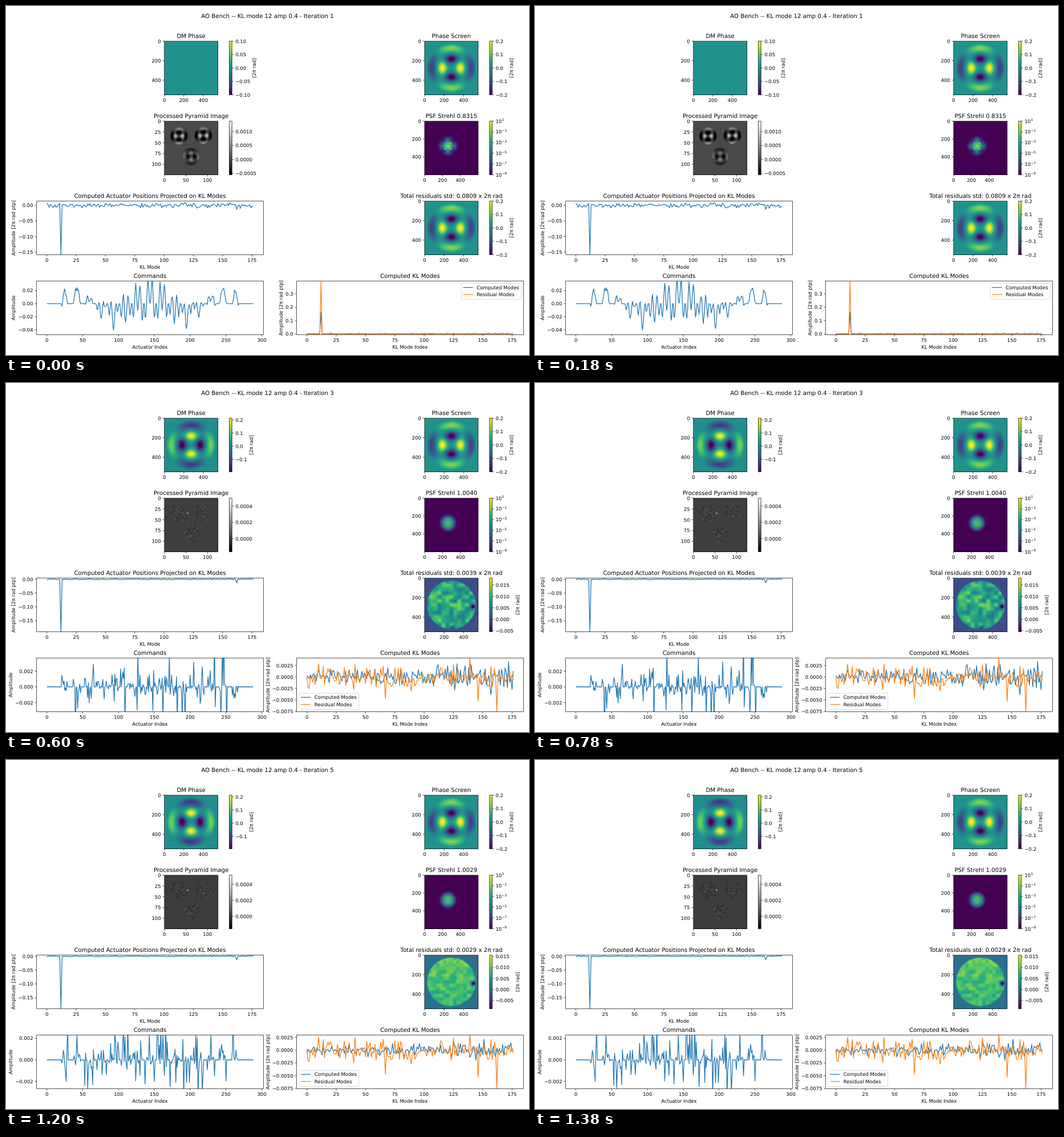
An HTML page with a canvas that plays this animation: 917 px wide and 611 px high, repeating every 1.5 s.

```html
<!DOCTYPE html>
<html lang="en">
<head>
<meta charset="utf-8">
<title>AO Bench</title>
<style>
html, body { margin: 0; width: 100%; height: 100%; overflow: hidden; background: #fff; }
canvas { display: block; }
</style>
</head>
<body>
<canvas id="stage" width="917" height="611"></canvas>
<script>
const W = 917, H = 611, STEP = 300;
const PT = 0.849, SMALL = 10 * PT, BIG = 12 * PT, SIDE = 94;
const BLUE = '#1f77b4', ORANGE = '#ff7f0e';
const FONT = '"DejaVu Sans", sans-serif';
const MODES = 177, GRID = 17, SPIKE = 12, HOT = 162;
let g;

const clamp = (v, a = 0, b = 1) => Math.min(b, Math.max(a, v));
const bell = (d, s) => Math.exp(-(d * d) / (s * s));
const inside = (r, R, soft = 1.5) => 1 / (1 + Math.exp((r - R) * soft));
const disc = (x, y) => inside(Math.hypot(x, y), 43, 2.5);

function random(seed) {
  let s = seed * 7919 + 17;
  return () => {
    s = (s + 0x6D2B79F5) | 0;
    let t = Math.imul(s ^ (s >>> 15), s | 1);
    t ^= t + Math.imul(t ^ (t >>> 7), t | 61);
    return ((t ^ (t >>> 14)) >>> 0) / 4294967296;
  };
}

// Smooth 2D noise from -1 to 1 on a repeating lattice
function mottle(seed, cell) {
  const n = 64, rnd = random(seed), grid = Array.from({ length: n * n }, () => rnd() * 2 - 1);
  const at = (i, j) => grid[(j & (n - 1)) * n + (i & (n - 1))];
  const ease = t => t * t * (3 - 2 * t);
  return (x, y) => {
    const u = x / cell, v = y / cell, i = Math.floor(u), j = Math.floor(v);
    const a = ease(u - i), b = ease(v - j);
    return (at(i, j) * (1 - a) + at(i + 1, j) * a) * (1 - b) +
      (at(i, j + 1) * (1 - a) + at(i + 1, j + 1) * a) * b;
  };
}

// Colour maps
const VIRIDIS = '440154 472d7b 3b528b 2c728e 21918c 28ae80 5ec962 addc30 fde725'.split(' ')
  .map(h => [0, 2, 4].map(k => parseInt(h.substr(k, 2), 16)));
function viridis(v) {
  const p = clamp(v) * 8, i = Math.min(7, Math.floor(p));
  return VIRIDIS[i].map((c, k) => c + (VIRIDIS[i + 1][k] - c) * (p - i));
}
const gray = v => Array(3).fill(clamp(v) * 255);

// Fields, in pixels from the panel centre
function mode(x, y) {
  const r = Math.hypot(x, y) || 1;
  const radial = 0.215 * bell(r - 16, 8) - 0.125 * bell(r - 35, 7.5);
  return (x * x - y * y) / (r * r) * radial * inside(r, 43);
}
const missed = (x, y) => mode(x, y) * (0.23 + 0.1 * Math.sin(y / 9));
const corrected = (x, y) => -mode(x, y) * 1.02;
const dmField = i => [() => 0, (x, y) => missed(x, y) - mode(x, y)][i] || corrected;

const coarse = mottle(3, 9), medium = mottle(4, 7), fine = mottle(5, 6);
const dent = (x, y) => bell(Math.hypot(x - 39, y - 3), 4);
const late = (x, y) => disc(x, y) * (0.0083 + 0.0028 * fine(x, y) - 0.00003 * y - 0.02 * dent(x, y));
const residuals = [
  mode,
  (x, y) => disc(x, y) * (missed(x, y) + 0.016 * coarse(x, y) + 0.005),
  (x, y) => disc(x, y) * (0.0085 + 0.005 * medium(x, y) - 0.016 * dent(x, y)
    - 0.012 * bell(Math.hypot(x - 2, y - 41), 5)),
  late,
  late
];

const PUPILS = [[-21.5, -21, 2.4], [21.5, -22, 2.4], [0, 15, -1.3]];
const grain = mottle(6, 4), dust = mottle(8, 1.3);
function pyramid(i, zero) {
  return (x, y) => {
    let v = zero;
    for (const [px, py, gain] of PUPILS) {
      const dx = x - px, dy = y - py, m = inside(Math.hypot(dx, dy), 15.5, 3);
      if (i === 0) v += m * (gain * mode(dx * 2.7, dy * 2.7) - 0.05 + 0.05 * grain(x, y));
      else v += m * (i === 1 ? 0.22 * grain(x, y) : 0.1 * dust(x, y));
    }
    return i > 1 ? v + 0.6 * bell(Math.hypot(x + 6, y + 21), 1.2) : v;
  };
}

function psf(i) {
  return (x, y) => {
    const dx = x + 6, dy = y + 3.5, r = Math.hypot(dx, dy), a = Math.atan2(dy, dx);
    const ring = Math.abs(Math.cos(Math.PI * r / 3.2)), env = 0.95 - 0.03 * r;
    if (i) return env * (0.35 + 0.65 * ring) * inside(r, 12, 0.6);
    const core = (0.7 + 0.2 * bell(r, 2) + 0.1 * dust(dx, dy)) * inside(r, 8.5 - Math.cos(4 * a), 1.3);
    return Math.max(core, env * ring * (0.65 + 0.35 * Math.cos(4 * a)) * inside(r, 15, 0.7));
  };
}

// Text and axes
function text(s, x, y, size = SMALL, align = 'center') {
  g.font = size + 'px ' + FONT;
  g.textAlign = align;
  g.fillStyle = '#000';
  g.fillText(s, x, y);
}
function upright(s, x, y) {
  g.save();
  g.translate(x, y);
  g.rotate(-Math.PI / 2);
  text(s, 0, 0);
  g.restore();
}
function width(s) {
  g.font = SMALL + 'px ' + FONT;
  return g.measureText(s).width;
}
function stroke(points, color, w) {
  g.beginPath();
  points.forEach(([x, y]) => g.lineTo(x, y));
  g.strokeStyle = color;
  g.lineWidth = w;
  g.lineJoin = 'round';
  g.stroke();
}
const hair = (...p) => stroke(p, '#000', 0.8 * PT);
function frame(x, y, w, h) {
  g.strokeStyle = '#000';
  g.lineWidth = 0.8 * PT;
  g.strokeRect(x, y, w, h);
}

// Smallest round step that splits the range into fewer than five parts
function niceStep(range) {
  const p = Math.floor(Math.log10(range)) - 1;
  const m = [1, 2, 2.5, 5, 10, 20, 25, 50].find(k => range / (k * 10 ** p) <= 4.95);
  return { step: m * 10 ** p, digits: (m >= 10 ? -p - 1 : -p) + (m % 5 === 2.5 || m === 25 ? 1 : 0) };
}
const label = (v, d) => (Math.abs(v) < 1e-9 ? 0 : v).toFixed(d).replace('-', '\u2212');

function xTick(x, y, s) {
  hair([x, y], [x, y + 3]);
  text(s, x, y + 12.4);
}
function yTick(x, y, s, dir) {
  hair([x, y], [x + 3 * dir, y]);
  text(s, x + 5.94 * dir, y + 3.1, SMALL, dir < 0 ? 'right' : 'left');
}
function yScale(x, top, [lo, hi], dir) {
  const { step, digits } = niceStep(hi - lo);
  let widest = 0;
  for (let k = Math.ceil(lo / step - 1e-3); k * step <= hi + step * 1e-3; k++) {
    const s = label(k * step, digits);
    yTick(x, top + (hi - k * step) / (hi - lo) * SIDE, s, dir);
    widest = Math.max(widest, width(s));
  }
  return widest;
}

const BAR = 113.9, BAR_W = 4.7;
function bar(x, y, map) {
  for (let k = 0; k < SIDE; k++) {
    g.fillStyle = `rgb(${map(1 - k / (SIDE - 1))})`;
    g.fillRect(x, y + k, BAR_W, k < SIDE - 1 ? 1.5 : 1);
  }
  frame(x, y, BAR_W, SIDE);
}
function barScale(x, y, range, unit) {
  const edge = x + BAR + BAR_W, w = yScale(edge, y, range, 1);
  if (unit) upright('[2π rad]', edge + 15.9 + w, y + SIDE / 2);
}
function powerScale(x, y) {
  const edge = x + BAR + BAR_W;
  for (let p = 1; p >= -9; p -= 2) {
    const ty = y + (1 - p) / 10 * SIDE;
    yTick(edge, ty, '10', 1);
    text(label(p, 0), edge + 6.1 + width('10'), ty - 0.2, SMALL * 0.7, 'left');
  }
}

function panel(x, y, title, field, map, [lo, hi], size = 550, xs = 200, ys = 200) {
  const n = SIDE + 1, img = new ImageData(n, n), off = document.createElement('canvas');
  off.width = off.height = n;
  for (let j = 0; j < n; j++) for (let i = 0; i < n; i++) {
    const c = map((field(i - SIDE / 2, j - SIDE / 2) - lo) / (hi - lo));
    img.data.set([...c, 255], (j * n + i) * 4);
  }
  off.getContext('2d').putImageData(img, 0, 0);
  g.drawImage(off, x, y, SIDE, SIDE);
  frame(x, y, SIDE, SIDE);
  for (let v = 0; v < size; v += xs) xTick(x + v / size * SIDE, y + SIDE, v);
  for (let v = 0; v < size; v += ys) yTick(x, y + v / size * SIDE, v, -1);
  text(title, x + SIDE / 2, y - 5.1, BIG);
  bar(x + BAR, y, map);
}
function phasePanel(x, y, title, field, range) {
  panel(x, y, title, field, viridis, range);
  barScale(x, y, range, true);
}

function chart(x, y, title, xlab, ylab, xstep, range, curves) {
  const [lo, hi] = range, n = curves[0].length, px = i => x + 18.1 + i * 361.8 / (n - 1);
  g.save();
  g.beginPath();
  g.rect(x, y, 398, SIDE);
  g.clip();
  curves.forEach((c, k) =>
    stroke(c.map((v, i) => [px(i), y + (hi - v) / (hi - lo) * SIDE]), k ? ORANGE : BLUE, 1.5 * PT));
  g.restore();
  frame(x, y, 398, SIDE);
  for (let v = 0; px(v) <= x + 398; v += xstep) xTick(px(v), y + SIDE, v);
  const w = yScale(x, y, range, -1);
  text(title, x + 199, y - 5.1, BIG);
  text(xlab, x + 199, y + SIDE + 24.6);
  upright(ylab, x - 11.2 - w, y + SIDE / 2);
}

function legend(x, y) {
  g.beginPath();
  g.roundRect(x, y, 105, 28, 1.7);
  g.fillStyle = 'rgba(255,255,255,.8)';
  g.fill();
  g.strokeStyle = 'rgba(204,204,204,.8)';
  g.lineWidth = PT;
  g.stroke();
  [['Computed Modes', BLUE], ['Residual Modes', ORANGE]].forEach(([s, c], k) => {
    const ty = y + 7 + k * 12.5;
    stroke([[x + 3.4, ty], [x + 20.4, ty]], c, 1.5 * PT);
    text(s, x + 27, ty + 3.1, SMALL, 'left');
  });
}

// Curves
function noise(n, seed, amp) {
  const rnd = random(seed);
  return Array.from({ length: n }, () => amp * (rnd() + rnd() + rnd() - 1.5) * 1.6);
}
const pin = (list, marks) => Object.assign(list, marks);

// Actuators stand on a square grid; those outside the pupil stay at rest
function commands(i, [lo, hi]) {
  const jitter = noise(GRID * GRID, 60 + i, (hi - lo) * (i ? 0.23 : 0.03));
  const mid = (GRID - 1) / 2, pitch = SIDE / GRID;
  return jitter.map((v, k) => {
    const x = k % GRID - mid, y = Math.floor(k / GRID) - mid;
    if (Math.hypot(x, y) > 8.1 || Math.max(Math.abs(x), Math.abs(y)) >= mid) return 0;
    if (i > 1) return v * Math.abs(v) / (hi - lo) * 4.5;
    return v + (i ? 0.2 * missed(x * pitch, y * pitch) : 0.19 * mode(x * pitch, y * pitch));
  });
}

const projected = (i, [lo]) =>
  pin(noise(MODES, 20 + (i > 0), i ? 0.0011 : 0.0045), { [SPIKE]: lo, [HOT]: -0.013 });

function modes(i, [lo, hi]) {
  if (i === 0) return [[0.004, 0.16], [0.002, hi]].map(([amp, top], k) =>
    pin(noise(MODES, 31 + k, amp).map(Math.abs), { [SPIKE]: top }));
  if (i === 1) {
    const fade = k => 0.35 + 0.8 * Math.exp(-k / 35);
    const base = noise(MODES, 33, 0.009).map((v, k) => v * fade(k));
    const extra = noise(MODES, 34, 0.005).map((v, k) => v * fade(k));
    return [pin(base.slice(), { [SPIKE]: 0.031 }),
      pin(base.map((v, k) => v + extra[k]), { [SPIKE]: hi, 6: lo })];
  }
  const amp = (hi - lo) * 0.13;
  return [
    noise(MODES, 35 + i, amp * (i > 2 ? 0.65 : 0.9)).map((v, k) => v * (0.5 + k / MODES)),
    pin(noise(MODES, 45, amp), { 67: lo * 0.62, 139: hi, 146: lo * 0.7, [HOT]: lo })];
}

// Value ranges of each panel
const SCREEN = [-.2, .2], DM = [-.196, .213], KL = [-.19, .0045];
const STATES = [
  { strehl: '0.8315', std: '0.0809', dm: [-.1, .1], res: SCREEN, pyr: [-.00055, .00138],
    kl: [-.1587, .0138], cmd: [-.0476, .0348], mod: [-.005, .395] },
  { strehl: '0.9868', std: '0.0196', dm: [-.158, .2], res: [-.0605, .0603], pyr: [-.000245, .000413],
    kl: [-.19, .0058], cmd: [-.0182, .0161], mod: [-.0225, .0638] },
  { strehl: '1.0040', std: '0.0039', dm: DM, res: [-.0055, .018], pyr: [-.000161, .000498],
    kl: KL, cmd: [-.00316, .00367], mod: [-.00762, .00416] },
  { strehl: '1.0007', std: '0.0030', dm: DM, res: [-.0095, .0148], pyr: [-.000168, .000504],
    kl: KL, cmd: [-.0023, .00256], mod: [-.00722, .00322] },
  { strehl: '1.0029', std: '0.0029', dm: DM, res: [-.0088, .0157], pyr: [-.000157, .000514],
    kl: KL, cmd: [-.00267, .0023], mod: [-.00754, .00296] }
];

function paint(s, i) {
  const page = document.createElement('canvas');
  page.width = W;
  page.height = H;
  g = page.getContext('2d');
  g.textRendering = 'geometricPrecision';
  g.fillStyle = '#fff';
  g.fillRect(0, 0, W, H);
  const L = 277.6, R = 733.9, Y = [61.5, 201.5, 341.5, 481.5];
  const amplitude = 'Amplitude [2π rad ptp]';
  text(`AO Bench -- KL mode 12 amp 0.4 - Iteration ${i + 1}`, W / 2, 20.8, BIG);

  phasePanel(L, Y[0], 'DM Phase', dmField(i), s.dm);
  phasePanel(R, Y[0], 'Phase Screen', mode, SCREEN);
  phasePanel(R, Y[2], `Total residuals std: ${s.std} x 2π rad`, residuals[i], s.res);

  const zero = -s.pyr[0] / (s.pyr[1] - s.pyr[0]);
  panel(L, Y[1], 'Processed Pyramid Image', pyramid(i, zero), gray, [0, 1], 124, 50, 25);
  barScale(L, Y[1], s.pyr, false);
  panel(R, Y[1], 'PSF Strehl ' + s.strehl, psf(i), viridis, [0, 1], 600);
  powerScale(R, Y[1]);

  chart(53.5, Y[2], 'Computed Actuator Positions Projected on KL Modes', 'KL Mode', amplitude,
    25, s.kl, [projected(i, s.kl)]);
  chart(53.5, Y[3], 'Commands', 'Actuator Index', 'Amplitude', 50, s.cmd, [commands(i, s.cmd)]);
  chart(509.5, Y[3], 'Computed KL Modes', 'KL Mode Index', amplitude, 25, s.mod, modes(i, s.mod));
  if (i < 2) legend(798.3, 485.7);
  else legend(513.7, 543.3);
  return page;
}

const pages = STATES.map(paint);
const stage = document.getElementById('stage').getContext('2d');
const start = performance.now();
function draw(now) {
  const t = Math.max(0, now - start) % (STEP * pages.length);
  stage.drawImage(pages[Math.floor(t / STEP)], 0, 0);
  requestAnimationFrame(draw);
}
draw(start);
</script>
</body>
</html>
```
